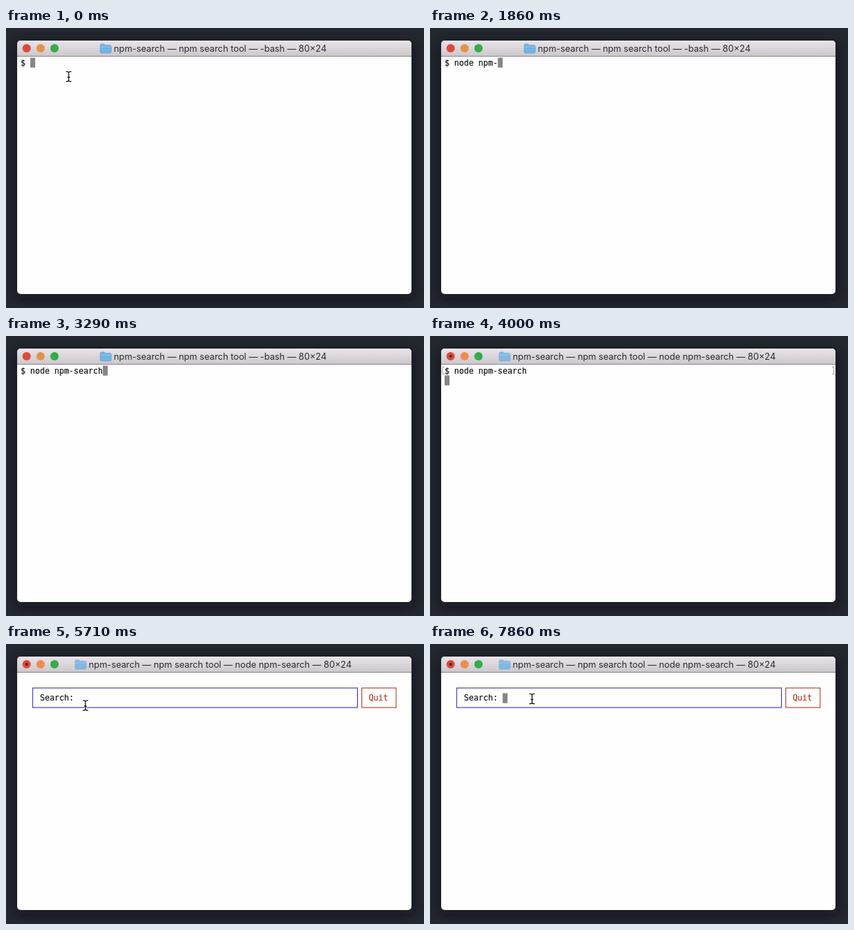
An HTML page that plays this animation: 600 by 401 pixels, repeating every 8 s.

```html
<!DOCTYPE html>
<html lang="en">
<head>
<meta charset="utf-8">
<title>Terminal session</title>
<style>
  html, body { margin: 0; width: 100%; height: 100%; overflow: hidden; background: #23272e; }
  svg { display: block; width: 600px; height: 401px; }
  .mono { font: 11.53px "DejaVu Sans Mono", monospace; white-space: pre; stroke-width: .2px; }
  .title { font: 12.75px Inter, sans-serif; fill: #2b292c; text-anchor: middle; }
</style>
</head>
<body>
<svg viewBox="0 0 600 401" xmlns="http://www.w3.org/2000/svg">
  <defs>
    <linearGradient id="bar" x2="0" y2="1">
      <stop offset="0" stop-color="#e9e4e9"/>
      <stop offset="1" stop-color="#cbc7cb"/>
    </linearGradient>
    <filter id="blur" x="-10%" y="-10%" width="120%" height="120%">
      <feGaussianBlur stdDeviation="8"/>
    </filter>
  </defs>
  <rect width="600" height="401" fill="#23272e"/>
  <rect x="14" y="22" width="570" height="365" rx="8" fill="#0c0e12" opacity=".6" filter="url(#blur)"/>
  <rect x="16" y="18" width="566" height="363" rx="5" fill="#fefefe"/>
  <path d="M16 40.5V23a5 5 0 0 1 5-5H577a5 5 0 0 1 5 5V40.5Z" fill="url(#bar)"/>
  <path d="M16 40.5H582" stroke="#88838f"/>

  <circle cx="29.6" cy="29" r="6" fill="#dc4a3c"/>
  <circle id="busy" cx="29.6" cy="29" r="2" fill="#5e0f0b"/>
  <circle id="amber" cx="49.6" cy="29" r="6"/>
  <circle cx="69.6" cy="29" r="6" fill="#34ab49"/>

  <g id="folder">
    <path d="M.5 2.5q0-2 2-2H6l1.6 1.7h7q1.9 0 1.9 1.8v7.6q0 1.9-1.9 1.9H2.4q-1.9 0-1.9-1.9Z" fill="#72b4e2" stroke="#5b9dcb" stroke-width=".6"/>
    <path d="M1 4.6H16" stroke="#93c9ee"/>
  </g>
  <text id="title" class="title" x="307.5" y="34"></text>

  <g id="shell">
    <text id="line" class="mono" x="21" y="53.6" fill="#111" stroke="#111"></text>
    <path id="marks" d="M20.5 44.5H18V54.5H20.5M577 44.5H579.8V54.5H577" fill="none" stroke="#999"/>
  </g>

  <g id="form">
    <g fill="none" stroke-width="1.1">
      <rect x="38.3" y="63" width="466.2" height="28" stroke="#3b31b8"/>
      <rect x="510.7" y="63" width="49.3" height="28" stroke="#b23a20"/>
    </g>
    <text class="mono" x="48.8" y="81.4" fill="#111" stroke="#111">Search:</text>
    <text class="mono" x="520.7" y="81.4" fill="#b23a20" stroke="#b23a20">Quit</text>
  </g>

  <rect id="caret" width="7" height="14.2" fill="#868686"/>
  <g id="pointer" fill="none" stroke-linecap="round">
    <path id="halo" stroke="#fff" stroke-width="2.8"/>
    <path id="beam" stroke="#111" stroke-width="1.3"/>
  </g>
</svg>
<script>
const $ = id => document.getElementById(id);
const LOOP = 8000, RATE = 7;
const CELL = 6.94, ROW = 14, LEFT = 21, TOP = 42.5;

// [tick, value] pairs; each value holds until the next tick.
const typed = [
  [0, ""], [3, "n"], [4, "no"], [5, "nod"], [6, "node"], [7, "node "],
  [10, "node n"], [11, "node npm"], [13, "node npm-"], [14, "node npm-s"],
  [16, "node npm-se"], [19, "node npm-sea"], [20, "node npm-sear"],
  [21, "node npm-search"], [22, "node npm-search "], [23, "node npm-search"]
];
const pointer = [
  [0, [90, 69.5]], [3, null],
  [40, [114, 88]], [41, [135, 98]], [42, [157, 101]], [43, [178, 94]], [44, [189, 86]],
  [46, [188.5, 86]], [47, [188, 86]], [48, [187, 86]],
  [51, [180, 84]], [52, [164, 80]], [53, [150, 78.5]], [55, [146.5, 78.5]]
];
const ENTER = 25, RUNNING = 26, SETTLED = 28, DRAWN = 34, FOCUS = 52;

const beam = "M-3.4-7.2Q-.4-7.2 0-5.6Q.4-7.2 3.4-7.2M0-5.6V5.6" +
  "M-3.4 7.2Q-.4 7.2 0 5.6Q.4 7.2 3.4 7.2M-1.3 1H1.3";
$("halo").setAttribute("d", beam);
$("beam").setAttribute("d", beam);

const held = (track, k) => track.filter(([at]) => at <= k).pop()[1];
const set = (id, name, value) => $(id).setAttribute(name, value);
const show = (id, on) => set(id, "visibility", on ? "visible" : "hidden");
const place = (id, x, y) => set(id, "transform", `translate(${x} ${y})`);

function text(id, value) {
  if ($(id).textContent !== value) $(id).textContent = value;
}

function caretCell(k, length) {
  if (k < ENTER) return [length, 0];
  if (k < DRAWN) return [0, 1];
  return k >= FOCUS ? [12, 2] : null;
}

function draw(ms) {
  // The small offset absorbs centisecond rounding of the frame clock.
  const k = Math.floor((ms % LOOP) * RATE / 1000 + 0.05);
  const running = k >= RUNNING;
  const line = "$ " + held(typed, k);

  text("title", `npm-search — npm search tool — ${running ? "node npm-search" : "-bash"} — 80×24`);
  place("folder", running ? 98.7 : 134.7, 22.4);
  set("folder", "opacity", running ? 0.85 : 1);
  set("amber", "fill", running ? "#f08a50" : "#e0944b");
  show("busy", running);

  text("line", line);
  show("line", k < DRAWN);
  show("marks", k >= ENTER && k < DRAWN);
  set("marks", "opacity", k < SETTLED ? 0.7 : 1);
  show("form", k >= DRAWN);

  const cell = caretCell(k, line.length);
  show("caret", cell);
  if (cell) place("caret", LEFT + cell[0] * CELL, TOP + cell[1] * ROW);

  const spot = held(pointer, k);
  show("pointer", spot);
  if (spot) place("pointer", ...spot);
}

let start;
function tick(now) {
  start ??= now;
  draw(Math.max(0, now - start));
  requestAnimationFrame(tick);
}
draw(0);
requestAnimationFrame(tick);
</script>
</body>
</html>
```
